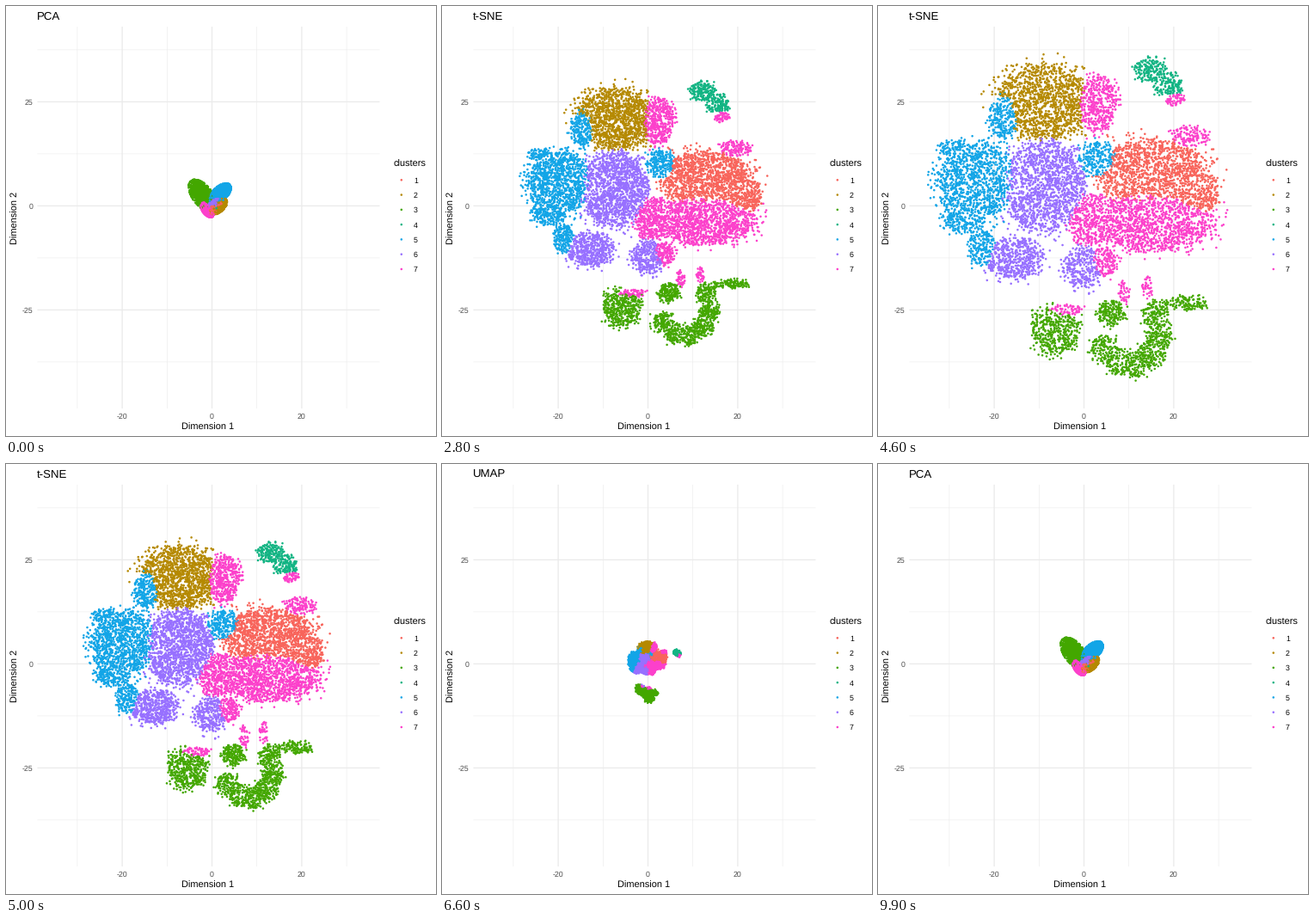
A matplotlib script for the animation above (10 s loop, 500 px wide and 500 px high).

```python
import numpy as np
import matplotlib.pyplot as plt
from matplotlib.animation import FuncAnimation

plt.rcParams["font.family"] = "Liberation Sans"
plt.rcParams["text.hinting"] = "none"
PX = 0.72  # points per pixel at 100 dpi
rng = np.random.default_rng(4)

COLORS = ["#F8645B", "#B58900", "#43A700", "#12B483", "#12A5E7", "#9770FF", "#FC40CB"]
TITLES = ["PCA", "t-SNE", "UMAP"]
RED, BROWN, GREEN, TEAL, BLUE, PURPLE, PINK = range(7)

# Ellipses of the t-SNE map per cluster: centre and radii
REGIONS = {
    RED: [(325, 190, 70, 41), (382, 215, 27, 28)],
    BROWN: [(190, 101, 58, 46)],
    GREEN: [(204, 389, 30, 28), (275, 367, 17, 17), (368, 354, 28, 9)],
    TEAL: [(321, 60, 20, 15), (344, 79, 18, 15)],
    BLUE: [(76, 160, 20, 11), (105, 200, 48, 46), (90, 243, 28, 24),
           (110, 286, 18, 22), (138, 120, 18, 28), (257, 174, 24, 22)],
    PURPLE: [(188, 207, 52, 57), (152, 298, 37, 27), (238, 310, 25, 25)],
    PINK: [(255, 102, 25, 34), (352, 97, 12, 8), (373, 145, 23, 12),
           (328, 252, 74, 38), (250, 250, 30, 32), (266, 303, 18, 18),
           (291, 340, 7, 13), (319, 335, 6, 13), (217, 363, 20, 7)],
}
# The green horseshoe
REGIONS[GREEN] += [(299 + 37 * np.cos(a), 390 + 41 * np.sin(a), 17, 17)
                   for a in np.radians(np.linspace(-30, 150, 6))]

# PCA centre and long radius per cluster
PCA = np.array([(243, 235, 9), (247, 233, 12), (228, 220, 21), (242, 233, 7),
                (249, 218, 15), (242, 229, 8), (234, 237, 10)])


def sample_tsne():
    """Uniform points, each coloured by its nearest region with fuzzy borders."""
    regions = np.array([r for group in REGIONS.values() for r in group])
    owner = np.repeat(list(REGIONS), [len(g) for g in REGIONS.values()])
    p = rng.uniform([40, 30], [425, 452], (26000, 2))
    unit = (p[:, None] - regions[:, :2]) / regions[:, 2:]
    dist = np.hypot(unit[..., 0], unit[..., 1])
    dist += rng.normal(0, 0.07, dist.shape)
    near = dist.argmin(axis=1)
    rows = np.arange(len(p))
    d = dist[rows, near]
    keep = (d < 1) | ((d < 1.3) & (rng.random(len(p)) < 0.13))
    return p[keep], unit[rows, near][keep], owner[near][keep]


def place_pca(unit, labels):
    """Two arms of a V; offsets run against those of the t-SNE regions."""
    x, y, r = PCA[labels].T
    angle = np.radians(np.where(x < 238, 53, -42))
    c, s = np.cos(angle), np.sin(angle)
    u, v = unit.T
    along, across = -0.5 * np.array([c * u + s * v, c * v - s * u])
    along, across = np.array([along, across]) + rng.normal(0, 0.35, (2, len(x)))
    limit = np.maximum(1, np.hypot(along, across))
    along, across = r * along / limit, 0.55 * r * across / limit
    return np.column_stack([x + c * along - s * across, y + s * along + c * across])


def place_umap(p):
    """Three islands, each a shrunken and sheared part of the t-SNE map."""
    x, y = p.T
    body = [218.5 + 0.116 * x - 0.03 * y, 201 + 0.126 * y]
    tail = [209 + 0.103 * x, 267 + 0.14 * (y - 395) + 0.05 * (x - 270)]
    islet = [273 + 0.1 * (x - 331), 220 + 0.1 * (y - 72)]
    out = np.where((x > 293) & (y < 122), islet, np.where(y > 338, tail, body))
    return out.T + rng.normal(0, 0.9, p.shape)


tsne, unit, labels = sample_tsne()
pca = place_pca(unit, labels)
layouts = [pca, tsne, place_umap(tsne), pca]

fig = plt.figure(figsize=(5, 5), dpi=100, facecolor="white")
ax = fig.add_axes([0, 0, 1, 1])
ax.set_xlim(0, 500)
ax.set_ylim(500, 0)
ax.axis("off")


def label(x, y, s, size, color="black", **kw):
    return ax.text(x, y, s, fontsize=size * PX, color=color, va="baseline", **kw)


def grid(xs, ys, width):
    style = dict(colors="#EBEBEB", linewidth=width * PX, zorder=1, snap=False)
    ax.vlines(xs, 24, 468, **style)
    ax.hlines(ys, 36.5, 434.5, **style)


def dots(points, colors):
    return ax.scatter(points[:, 0], points[:, 1], s=(2.7 * PX) ** 2, c=colors,
                      marker=(8, 0, 0), linewidths=0, zorder=3)


X0, Y0, SX, SY = 239.5, 232.4, 5.22, 4.84
x_ticks, y_ticks = np.arange(-20, 21, 20), np.arange(-25, 26, 25)
grid(X0 + SX * np.arange(-30, 31, 20), Y0 - SY * np.arange(-37.5, 38, 25), 0.6)
grid(X0 + SX * x_ticks, Y0 - SY * y_ticks, 1.3)

for v in x_ticks:
    label(X0 + SX * v, 480, str(v), 8.8, "#4D4D4D", ha="center")
for v in y_ticks:
    label(31.5, Y0 - SY * v + 3.2, str(v), 8.8, "#4D4D4D", ha="right")
label(235, 493, "Dimension 1", 11, ha="center")
label(13.5, 246, "Dimension 2", 11, ha="center", rotation=90, rotation_mode="anchor")

label(451, 187, "clusters", 11)
rows = 202.3 + 17.28 * np.arange(7)
dots(np.column_stack([np.full(7, 459.8), rows]), COLORS)
for i, y in enumerate(rows):
    label(474, y + 3.4, str(i + 1), 8.8)

title = label(36, 16, TITLES[0], 13.2)
cloud = dots(pca, np.array(COLORS)[labels])

STEP = 1 / 22
KEY_FRAMES = [0, 11, 33, 45, 46, 66, 78, 98, 99]
KEY_STAGES = [0, 0, 1, 1, 1 + 2 * STEP, 2, 2, 2 + 20 * STEP, 3]


def update(k):
    stage = round(float(np.interp(k, KEY_FRAMES, KEY_STAGES)), 6)
    leg = min(int(stage), 2)
    t = stage - leg
    cloud.set_offsets((1 - t) * layouts[leg] + t * layouts[leg + 1])
    title.set_text(TITLES[int(np.ceil(stage - 0.5)) % 3])
    return cloud, title


anim = FuncAnimation(fig, update, frames=100, interval=100, repeat=True, repeat_delay=0)
plt.show()
```
